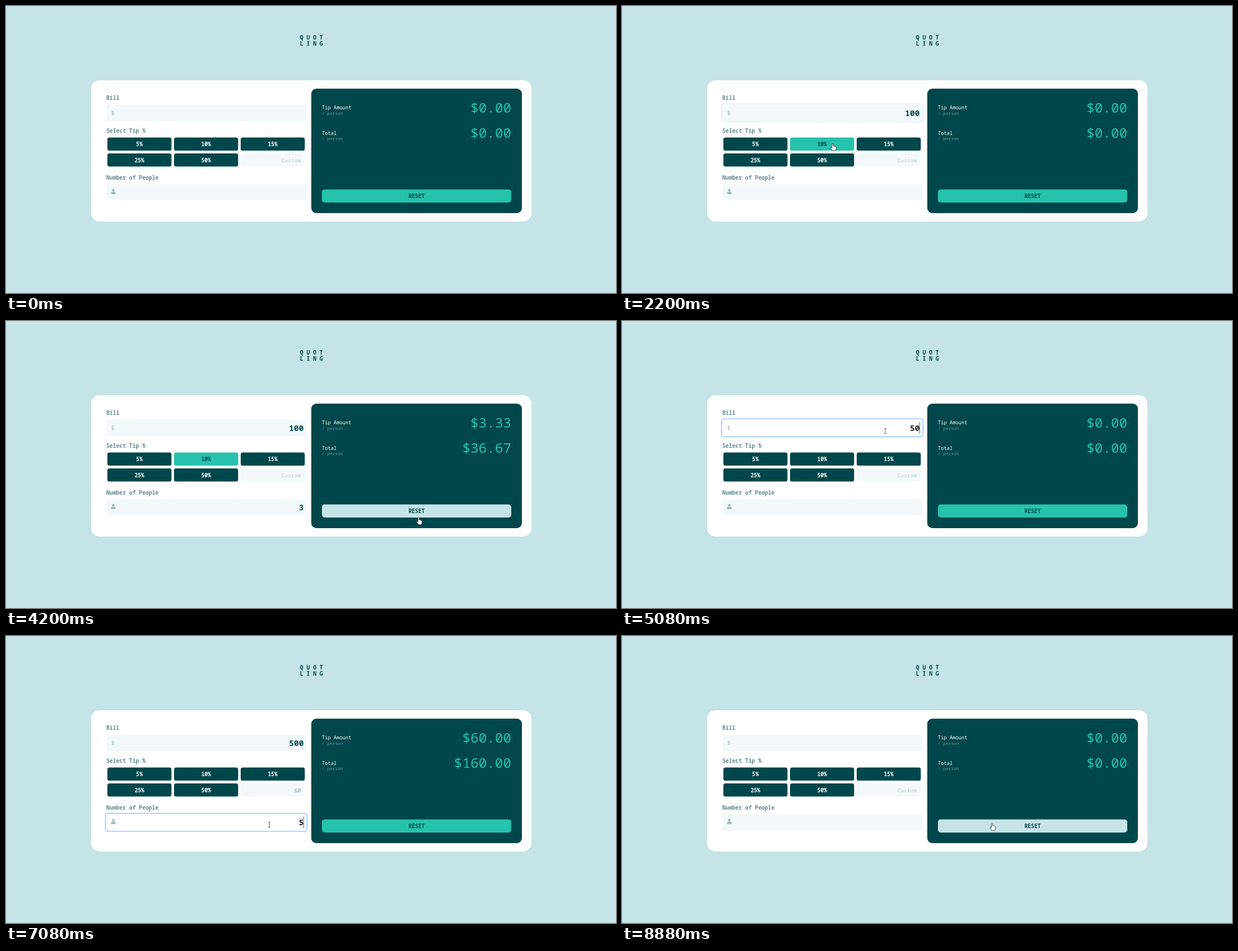
An HTML page for the animation above (8.92 s loop, 1089 px wide and 514 px high).

```html
<!DOCTYPE html>
<html lang="en">
<head>
<meta charset="utf-8">
<title>Tip calculator</title>
<style>
  html, body { margin: 0; width: 100%; height: 100%; overflow: hidden; background: #c5e4e7; }
  svg { display: block; width: 1089px; height: 514px; }
  text { font-family: "Noto Sans Mono", "DejaVu Sans Mono", monospace; white-space: pre; }
  .b { font-weight: 700; }
  .end { text-anchor: end; }
  .mid { text-anchor: middle; }
</style>
</head>
<body>
<svg id="stage" viewBox="0 0 1089 514" xmlns="http://www.w3.org/2000/svg"></svg>
<script>
const LOOP = 8920, STEP = 40;
const DARK = '#00474b', MINT = '#26c2ad', PALE = '#c5e4e7', FIELD = '#f3f9fa';
const LABEL = '#668a8d', ICON = '#9dbdbb';
const stage = document.getElementById('stage');

function add(tag, attrs, parent = stage) {
  const el = document.createElementNS('http://www.w3.org/2000/svg', tag);
  set(el, attrs);
  parent.appendChild(el);
  return el;
}
function set(el, attrs) {
  for (const k in attrs) el.setAttribute(k, attrs[k]);
}
function box(x, y, w, h, r, fill) {
  return add('rect', { x, y, width: w, height: h, rx: r, fill });
}
function text(str, x, y, size, fill, cls = '') {
  const el = add('text', { x, y, 'font-size': size, fill, class: cls });
  el.textContent = str;
  return el;
}
function show(el, on) {
  el.setAttribute('visibility', on ? 'visible' : 'hidden');
}

// Static page
box(0, 0, 1089, 514, 0, PALE);
['QUOT', 'LING'].forEach((row, i) =>
  set(text(row, 524.8, 59.5 + 11.8 * i, 9.9, DARK, 'b'), { 'letter-spacing': 5.76 }));
box(152, 133, 786, 253, 15, '#fff');
box(545, 148, 376, 223, 9, DARK);
text('Bill', 179, 168, 9.72, LABEL, 'b');
text('Select Tip %', 179, 226.6, 9.72, LABEL, 'b');
text('Number of People', 179, 310.6, 9.72, LABEL, 'b');

function makeField(y) {
  const ring = add('rect', { x: 177.8, y: y - 1.2, width: 359.4, height: 32, rx: 4,
    fill: 'none', stroke: '#b9d7ff', 'stroke-width': 2.6 });
  const area = box(179, y, 357, 29.6, 2.5, FIELD);
  const value = text('', 531.6, y + 20.4, 14.58, DARK, 'b end');
  const caret = box(531, y + 4, 1, 21.5, 0, '#666');
  return { ring, area, value, caret };
}
const bill = makeField(176.5), people = makeField(319);
text('$', 187.2, 195, 11.6, ICON);
add('circle', { cx: 191.5, cy: 329.9, r: 2.4, fill: ICON });
add('path', { d: 'M187.4 337V335.4Q187.4 332.6 190 332.6H193Q195.6 332.6 195.6 335.4V337Z', fill: ICON });

const tips = [5, 10, 15, 25, 50].map((pct, i) => {
  const x = 181 + 119 * (i % 3), y = i < 3 ? 235.4 : 264;
  return { pct, x, y, area: box(x, y, 114.4, 23.6, 3.6, DARK),
    label: text(pct + '%', x + 57.2, y + 15.5, 9.72, '#fff', 'b mid') };
});
const outline = add('rect', { x: 415.8, y: 261, width: 120.6, height: 29.8, rx: 5.5,
  fill: '#fff', stroke: '#0f5fd0', 'stroke-width': 1.5 });
box(419, 264, 114.4, 23.6, 3, FIELD);
const customText = text('Custom', 526.4, 279.5, 9.72, '#b9cdcd', 'end');
const customCaret = box(526, 268, 1, 15, 0, '#777');

function makeResult(title, y) {
  text(title, 564, y + 3.2, 8.75, '#fff');
  text('/ person', 564, y + 13, 7.8, '#6d9699');
  return text('$0.00', 902, y + 8.7, 24.28, MINT, 'end');
}
const tipOut = makeResult('Tip Amount', 181.8), totalOut = makeResult('Total', 227.4);
const resetArea = box(564, 328.4, 338, 23.6, 5, MINT);
text('RESET', 733, 344, 9.72, DARK, 'b mid');

// Pointer
const pointer = add('g', {});
const shapes = {
  arrow: add('path', { d: 'M0 0V9.8L2.2 7.8L3.8 11.2L5.4 10.5L3.9 7.2H6.9Z',
    fill: '#fff', stroke: '#222', 'stroke-width': .8 }, pointer),
  beam: add('path', { d: 'M-2 -4.8Q0 -4.8 0 -3.8Q0 -4.8 2 -4.8M0 -3.8V3.8M-2 4.8Q0 4.8 0 3.8Q0 4.8 2 4.8',
    fill: 'none', stroke: '#444', 'stroke-width': .9 }, pointer),
  hand: add('path', { d: 'M-1.1 1Q0 -.6 1.1 1V5Q2 4 3 5.2Q4 4.6 5 5.8Q6.3 5.5 6.3 7V10Q6 12 5 13.3H0Q-1 12 -3.4 9Q-4.2 7.5 -3 7.2Q-2 7 -1.1 8.4Z',
    fill: '#fff', stroke: '#222', 'stroke-width': .8 }, pointer)
};

// Time, x, y
const path = [
  [160, 637, 500], [640, 447, 200], [1960, 447, 200], [2120, 376, 246],
  [2440, 376, 246], [2640, 400, 336], [2960, 406.5, 344], [3320, 406.5, 344],
  [3640, 520, 408], [4000, 520, 408], [4200, 736.5, 351.5], [4320, 738, 345.5],
  [4480, 738, 345.5], [4760, 470, 197], [5160, 470, 197], [5360, 496, 279],
  [5640, 501.5, 287.8], [6320, 501.5, 287.8], [6640, 480, 332], [7000, 470, 338],
  [7080, 470, 338], [7560, 517, 398], [8160, 517, 398], [8400, 674, 341],
  [8560, 674, 341], [8880, 660.5, 335]
];
const typed = {
  bill: [[0, ''], [1160, '1'], [1320, '10'], [1440, '100'], [4280, ''],
    [5000, '5'], [5080, '50'], [5160, '500'], [8560, '']],
  people: [[0, ''], [3320, '3'], [4280, ''], [7040, '5'], [8560, '']],
  custom: [[0, ''], [6160, '6'], [6280, '60'], [8560, '']],
  tip: [[0, 0], [2160, 10], [4280, 0]]
};
const focus = {
  bill: [[800, 2160], [4680, 5320]],
  people: [[2640, 3440], [6640, 7200]],
  custom: [[5320, 6640]]
};
const caretOff = [[1680, 2160], [3160, 3320], [5840, 6120]];

const within = (t, spans) => spans.some(([a, b]) => t >= a && t < b);
const current = (t, keys) => keys.filter(k => k[0] <= t).pop()[1];
const clamp = v => Math.max(0, Math.min(1, v));

function pointerAt(t) {
  let i = 0;
  while (i < path.length - 2 && path[i + 1][0] <= t) i++;
  const [t0, x0, y0] = path[i], [t1, x1, y1] = path[i + 1];
  const u = clamp((t - t0) / (t1 - t0)), e = u * u * (3 - 2 * u);
  return [x0 + (x1 - x0) * e, y0 + (y1 - y0) * e];
}
function ringAt(t, spans) {
  return Math.max(...spans.map(([a, b]) =>
    Math.min(clamp((t - a + STEP) / 120), clamp(1 - (t - b + STEP) / 120))));
}
function drawField(field, name, t) {
  const on = within(t, focus[name]);
  set(field.ring, { opacity: ringAt(t, focus[name]) });
  set(field.area, { fill: on ? '#fff' : FIELD });
  set(field.value, { fill: on ? '#212529' : DARK });
  field.value.textContent = current(t, typed[name]);
  show(field.caret, on && !within(t, caretOff));
}

function draw(t) {
  const [x, y] = pointerAt(t), here = t >= 160;
  const over = (bx, by, w, h) => here && x >= bx && x <= bx + w && y >= by && y <= by + h;
  let kind = 'arrow';
  if (over(179, 176, 357, 30) || over(179, 319, 357, 30) || over(419, 264, 114.4, 24)) kind = 'beam';

  drawField(bill, 'bill', t);
  drawField(people, 'people', t);

  const picked = current(t, typed.tip);
  for (const b of tips) {
    const hover = over(b.x, b.y, 114.4, 23.6), lit = hover || picked === b.pct;
    if (hover) kind = 'hand';
    set(b.area, { fill: lit ? MINT : DARK });
    set(b.label, { fill: lit ? DARK : '#fff' });
  }

  const custom = current(t, typed.custom), customOn = within(t, focus.custom);
  show(outline, customOn);
  customText.textContent = custom || 'Custom';
  set(customText, { fill: custom ? '#7f9d9f' : '#b9cdcd' });
  show(customCaret, customOn && !within(t, caretOff));

  const sum = +current(t, typed.bill), count = +current(t, typed.people);
  const tip = count ? sum * (picked || +custom) / 100 / count : 0;
  tipOut.textContent = '$' + tip.toFixed(2);
  totalOut.textContent = '$' + (count ? sum / count + tip : 0).toFixed(2);

  const onReset = over(564, 328.4, 338, 23.6);
  if (onReset) kind = 'hand';
  set(resetArea, { fill: onReset ? PALE : MINT });

  set(pointer, { transform: `translate(${x} ${y})` });
  for (const k in shapes) show(shapes[k], here && k === kind);
}

const start = performance.now();
function tick() {
  const t = (performance.now() - start) % LOOP;
  draw(Math.floor(t / STEP) * STEP);
  requestAnimationFrame(tick);
}
tick();
</script>
</body>
</html>
```
